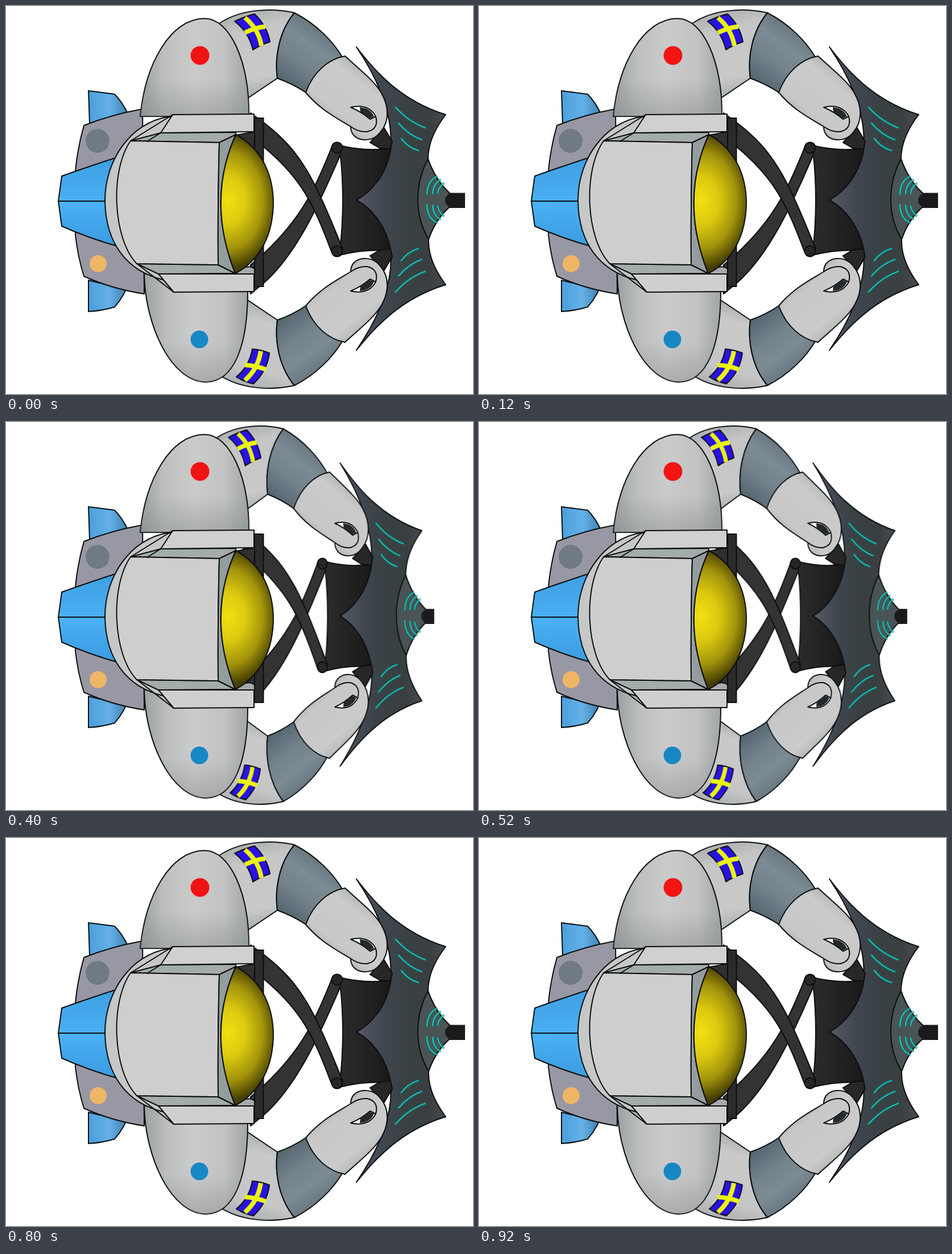
Animation of 821x682 px, one loop 1000 ms. Source, as an HTML page:

```html
<!DOCTYPE html>
<html lang="en">
<head>
<meta charset="utf-8">
<title>Astronaut from above</title>
<style>
  html, body { margin: 0; width: 100%; height: 100%; overflow: hidden; background: #fff; }
  svg { display: block; width: 100%; height: 100%; }
  .ink { stroke: #0b0d0f; stroke-width: 2; stroke-linejoin: round; stroke-linecap: round; }
  .line { fill: none; }
  .bar { fill: #333; }
  .glow { fill: none; stroke: #0d7775; stroke-width: 5; stroke-linecap: round; opacity: .45; }
  .neon { fill: none; stroke: #17d3c6; stroke-width: 1.8; stroke-linecap: round; }

  /* The arms and the device recoil towards the body in held poses. */
  .recoil { transform-origin: 0 0; animation: recoil 1s step-end infinite; }
  .barrel { width: 27px; animation: barrel 1s step-end infinite; }
  @keyframes recoil {
    0%, 80% { transform: none; }
    20% { transform: matrix(.885, 0, 0, 1, 33, 0); }
    40% { transform: matrix(.916, 0, 0, 1, 23, 0); }
    60% { transform: matrix(.953, 0, 0, 1, 13.4, 0); }
  }
  @keyframes barrel {
    0%, 80% { width: 27px; }
    20% { width: 7.6px; }
    40% { width: 17px; }
    60% { width: 24.4px; }
  }
</style>
</head>
<body>
<svg viewBox="0 0 821 682" preserveAspectRatio="none">
  <defs>
    <linearGradient id="shoulder">
      <stop offset="0" stop-color="#9ca1a1"/>
      <stop offset=".22" stop-color="#bdbfbf"/>
      <stop offset=".5" stop-color="#cbcbcb"/>
      <stop offset=".78" stop-color="#c2c2c2"/>
      <stop offset="1" stop-color="#a0a5a5"/>
    </linearGradient>
    <linearGradient id="shade" x1="0" y1="0" x2="0" y2="1">
      <stop offset=".62" stop-color="#78807f" stop-opacity="0"/>
      <stop offset="1" stop-color="#78807f" stop-opacity=".4"/>
    </linearGradient>
    <linearGradient id="sleeve" x1=".4" y1="0" x2=".65" y2="1">
      <stop offset="0" stop-color="#a8adad"/>
      <stop offset=".22" stop-color="#c6c6c6"/>
      <stop offset=".7" stop-color="#c9c9c9"/>
      <stop offset="1" stop-color="#929a9a"/>
    </linearGradient>
    <linearGradient id="elbow" x1=".8" y1="0" x2=".2" y2="1">
      <stop offset="0" stop-color="#53636d"/>
      <stop offset=".42" stop-color="#7d8b94"/>
      <stop offset=".65" stop-color="#73828b"/>
      <stop offset="1" stop-color="#50606a"/>
    </linearGradient>
    <linearGradient id="glove" x1=".8" y1=".15" x2=".25" y2=".85">
      <stop offset="0" stop-color="#adb0b0"/>
      <stop offset=".25" stop-color="#cbcbcb"/>
      <stop offset=".75" stop-color="#c8c8c8"/>
      <stop offset="1" stop-color="#9ea3a3"/>
    </linearGradient>
    <linearGradient id="cape" gradientUnits="userSpaceOnUse" x1="616" y1="0" x2="775" y2="0">
      <stop offset="0" stop-color="#565a67"/>
      <stop offset=".3" stop-color="#3f464e"/>
      <stop offset=".55" stop-color="#394143"/>
      <stop offset=".8" stop-color="#3a3f41"/>
      <stop offset="1" stop-color="#4b4c50"/>
    </linearGradient>
    <linearGradient id="box">
      <stop offset="0" stop-color="#2c2c2c"/>
      <stop offset="1" stop-color="#181818"/>
    </linearGradient>
    <linearGradient id="fin">
      <stop offset="0" stop-color="#4a9fdc"/>
      <stop offset=".55" stop-color="#64b0e6"/>
      <stop offset="1" stop-color="#4084b4"/>
    </linearGradient>
    <linearGradient id="tank" x1="0" y1="0" x2="0" y2="1">
      <stop offset="0" stop-color="#3f9fe2"/>
      <stop offset=".5" stop-color="#4ab0f4"/>
      <stop offset="1" stop-color="#3b9be0"/>
    </linearGradient>
    <radialGradient id="visor" gradientUnits="userSpaceOnUse" cx="390" cy="342" r="120"
                    gradientTransform="translate(390 342) scale(.74 1) translate(-390 -342)">
      <stop offset="0" stop-color="#f1df12"/>
      <stop offset=".35" stop-color="#dcca10"/>
      <stop offset=".7" stop-color="#a3940b"/>
      <stop offset="1" stop-color="#453d02"/>
    </radialGradient>

    <g id="arm">
      <path class="ink" fill="url(#sleeve)" d="M350 60Q362 42 376 30C410 7 462 2 507 12C480 45 472 90 477 127L428 160L400 178Z"/>
      <path class="ink" fill="url(#elbow)" d="M507 12C546 32 575 62 592 91L527 152Q505 137 477 127C472 90 480 45 507 12Z"/>
    </g>
    <g id="hand">
      <path class="ink" fill="#272727" d="M640 240L664 213L679 238L676 252L657 250Z"/>
      <path class="ink" fill="url(#glove)" d="M527 152C540 116 567 93 596 88C622 112 648 132 660 153C673 176 675 202 658 222C645 239 622 238 612 228Q606 222 606 212C578 195 552 182 527 152Z"/>
      <path class="ink" fill="#fff" d="M606 178Q637 171 650 194L640 199Q625 186 606 178Z"/>
      <path fill="#24292c" d="M622 178Q640 179 647 194L639 198Q631 190 623 187Z"/>
      <path class="ink line" d="M650 194Q656 216 635 221Q620 222 606 212"/>
    </g>
    <g id="lights">
      <path d="M685 178Q707 203 737 214M690 206Q708 227 731 235M695 233Q707 249 725 254"/>
      <path d="M740 331Q741 307 757 300M750 330Q751 313 763 306M759 329Q760 319 769 312"/>
    </g>
    <g id="lamps">
      <use href="#lights"/>
      <use href="#lights" transform="matrix(1 0 0 -1 0 680.5)"/>
    </g>
  </defs>

  <!-- backpack -->
  <g class="ink">
    <path fill="url(#fin)" d="M145 149L191 155Q205 170 213 187L147 207Z"/>
    <path fill="url(#fin)" d="M145 482L211 498Q203 516 191 529Q168 536 145 537Z"/>
    <path fill="#9898a5" d="M137 210Q185 191 240 181L243 506Q185 497 137 475Q126 440 122 402V290Q126 248 137 210Z"/>
    <path fill="url(#tank)" d="M98 299Q140 284 192 267L202 424Q145 408 98 387L92 343Z"/>
    <path class="line" d="M92 343H176"/>
  </g>
  <circle cx="161" cy="237" r="21" fill="#6f7a83"/>
  <circle cx="162" cy="453" r="15" fill="#efb566"/>

  <!-- moving arms and device -->
  <g class="recoil">
    <use href="#arm"/>
    <use href="#arm" transform="matrix(1 0 0 -1 0 679)"/>
    <g class="ink">
      <g fill="#2a12e4">
        <path d="M402 27Q420 18 437 14Q459 35 464 63Q448 68 434 77Q427 46 402 27Z"/>
        <path d="M434 603Q449 604 464 610Q460 642 436 664Q420 661 406 652Q429 633 434 603Z" transform="translate(-1 0)"/>
      </g>
    </g>
    <g fill="none" stroke="#e9f50a" stroke-width="8">
      <path d="M420 20.500Q444 40 449 70M420 47Q438 38 456 36"/>
      <path d="M448 606.500Q443 638 420 658M420 631Q439 632 457 639"/>
    </g>

    <path class="ink bar" d="M430 506L452 488C510 438 550 350 592 252L573 247C545 318 520 373 452 436L430 455Z"/>
    <path class="ink" fill="url(#box)" d="M586 245Q635 257 682 249V431Q635 426 586 438Q598 341 586 245Z"/>
    <path class="ink bar" d="M430 188L452 204C520 256 541 302 592 427L573 434C540 347 520 303 452 247L430 232Z"/>
    <g class="ink" fill="#262626">
      <circle cx="582" cy="249" r="9.500"/>
      <circle cx="582" cy="431" r="9.500"/>
    </g>

    <path class="ink" stroke-width="2.500" fill="url(#cape)" d="M616 72C645 110 690 165 773 191C752 218 742 245 742 269Q755 306 780 329V353Q755 375 743 410C742 434 752 462 773 490C690 515 645 570 616 605C655 548 682 486 676 427C668 388 645 357 616 341C645 325 668 295 676 255C682 192 655 130 616 72Z"/>
    <path class="ink" fill="#4a5455" d="M742 269Q755 306 780 329V353Q755 375 743 410Q724 378 724 340Q724 302 742 269Z"/>
    <use href="#lamps" class="glow"/>
    <use href="#lamps" class="neon"/>
    <circle cx="784" cy="341.500" r="12" fill="#191b1c"/>
    <rect class="barrel" x="780" y="328.500" height="26.500" fill="#191b1c"/>

    <use href="#hand"/>
    <use href="#hand" transform="matrix(1 0 0 -1 0 679)"/>
  </g>

  <!-- shoulders -->
  <g id="domes">
    <path class="ink" fill="url(#shoulder)" d="M236 194C245 100 290 22 349 22C395 22 428 100 427 194Z"/>
    <path fill="url(#shade)" d="M236 194C245 100 290 22 349 22C395 22 428 100 427 194Z"/>
    <path class="ink" fill="url(#shoulder)" d="M243 470C244 560 290 661 352 661C400 660 425 600 425 500Z"/>
    <path fill="url(#shade)" d="M243 470C244 560 290 661 352 661C400 660 425 600 425 500Z"/>
  </g>
  <circle cx="341" cy="87" r="16.500" fill="#f01414"/>
  <circle cx="340" cy="586" r="15.500" fill="#1787c4"/>

  <!-- helmet -->
  <g class="ink">
    <path fill="#2b2b2b" d="M437 197H452.500V493H437Z"/>
    <path fill="#303030" d="M404 227L437 221V270Z"/>
    <path fill="#a5abab" d="M403 469Q425 452 437 462V473H403Z"/>
    <path fill="#c6c8c8" d="M288 194C215 206 174 275 174 342C175 420 215 466 275 481L300 470V222Z"/>
    <path fill="#a4abab" d="M272 223L404 222V227L375 240L219 237Z"/>
    <path fill="#a4abab" d="M230 453L373 455L403 470L268 471Z"/>
    <path fill="#cecece" d="M219 237L375 240Q372 345 373 455L230 453C188 410 182 290 219 237Z"/>
    <path fill="#949c9e" d="M375 240L404 226Q352 342 403 470L373 455Q372 345 375 240Z"/>
    <path fill="url(#visor)" d="M404 226C451 252 470 298 470 347C469 400 449 446 403 470Q352 342 404 226Z"/>
    <path fill="#d0d0d0" d="M293 191L436 190V221L272 223Z"/>
    <path fill="#cfcfcf" d="M268 471L436 471V502L295 503Z"/>
    <path class="line" d="M293 191L219 237M272 223L248 238M230 453L295 503"/>
  </g>
</svg>
</body>
</html>
```
